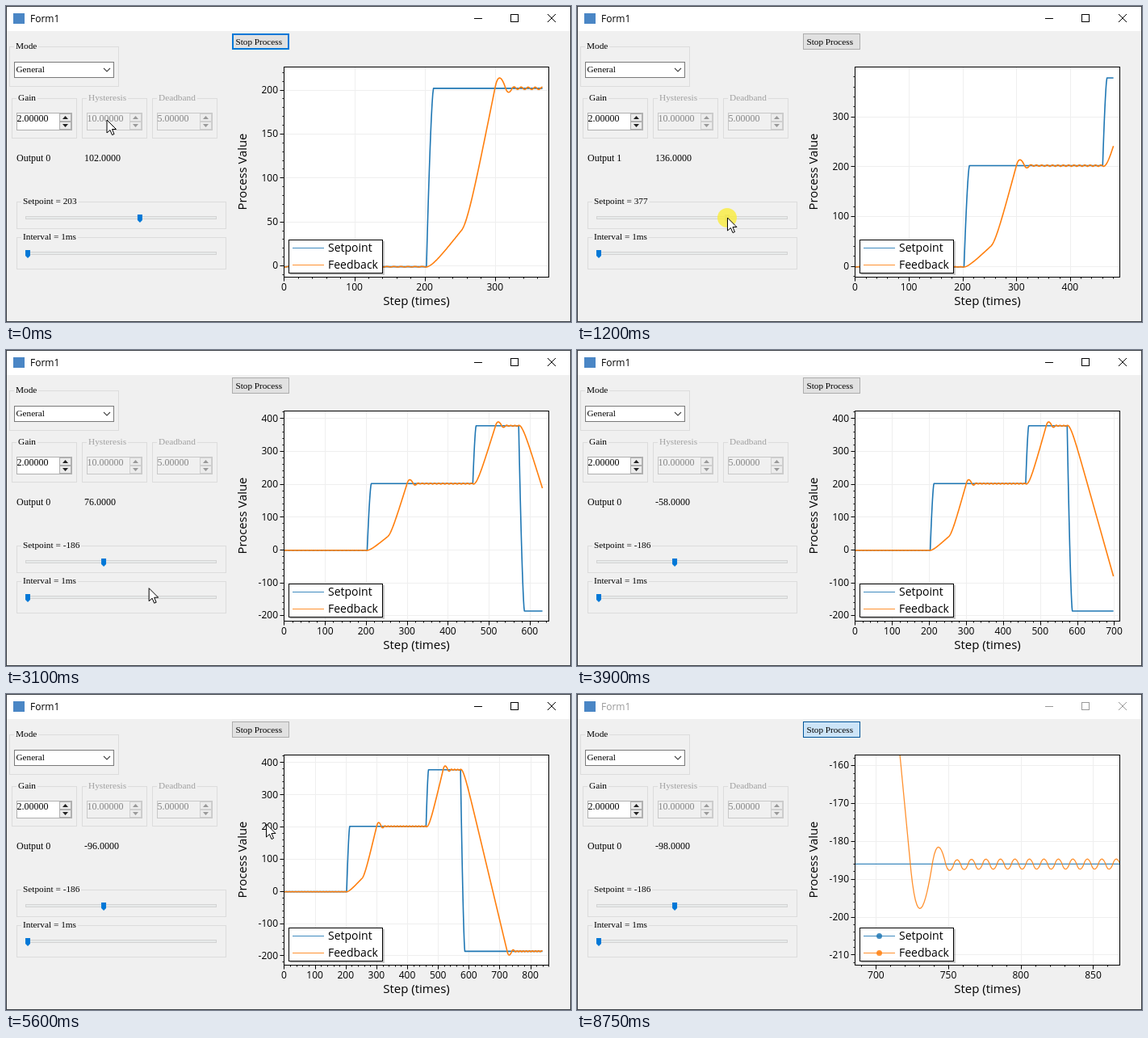
An HTML page with a canvas that plays this animation: 700x391 px, repeating every 8800 ms.

```html
<!DOCTYPE html>
<html lang="en">
<head>
<meta charset="utf-8">
<title>Form1</title>
<style>
html, body { margin: 0; width: 100%; height: 100%; overflow: hidden; background: #f0f0f0; }
canvas { display: block; width: 100vw; height: 100vh; }
</style>
</head>
<body>
<canvas id="stage" width="700" height="391"></canvas>
<script>
const c = document.getElementById('stage').getContext('2d');
const SERIF = '"Liberation Serif", serif', SANS = '"Open Sans", sans-serif';
const BLUE = '#1f77b4', ORANGE = '#ff7f0e', ACCENT = '#0078d7';
const LOOP = 8800, LAST = 869, ZOOM = 7300;
const BOX = { l: 344.5, r: 672.5, t: 75.5, b: 335.5 };

// Setpoint moves: first step, duration, new value
const moves = [[202, 10, 202], [460, 8, 378], [572, 14, -186]];
function setpoint(n) {
  let v = -1;
  for (const [start, len, to] of moves) {
    const p = Math.min(1, Math.max(0, (n - start) / len));
    v += (to - v) * (1 - (1 - p) ** 1.5);
  }
  return v;
}

// Up/down controller with a first-order process
const log = [];
let fb = -1.218, out = -1.75;
for (let n = 0; n <= LAST; n++) {
  const sp = setpoint(n), up = sp > fb;
  out += (up ? 1 : -1) * (n > 253 ? 2 : 0.5);
  if (n === 253) out = 26;
  fb += 0.1 * (2 * out - fb);
  log.push({ sp, fb, out, up });
}

// Linear interpolation in rows of [time, ...values]
function at(keys, t) {
  if (t <= keys[0][0]) return keys[0].slice(1);
  const i = keys.findIndex(k => k[0] >= t);
  if (i < 0) return keys[keys.length - 1].slice(1);
  const a = keys[i - 1], b = keys[i], p = (t - a[0]) / (b[0] - a[0]);
  return a.slice(1).map((v, j) => v + (b[j + 1] - v) * p);
}
const steps = [[0, 367], [1200, 480], [2350, 568], [3900, 697], [4850, 776], [5970, LAST]];
const approach = [[0, 125, 141], [150, 126, 143], [450, 150, 215], [750, 166, 262]];
const leave = [[2650, 121, 262], [2900, 140, 275], [3600, 270, 344], [3750, 300, 391]];
const toPlot = [[5450, 330, 338], [5550, 325, 200], [5750, 315, 44], [6050, 315, 44],
  [6300, 345, 89], [6650, 600, 305], [6800, 597, 306], [7150, 654, 327], [7250, 664, 328],
  [7900, 664, 328], [8250, 671, 367]];

function text(s, x, y, size, color = '#000', font = SERIF, align = 'left') {
  c.font = size + 'px ' + font;
  c.textAlign = align;
  c.fillStyle = color;
  c.fillText(s, x, y);
}
function rect(x, y, w, h, fill, stroke) {
  if (fill) { c.fillStyle = fill; c.fillRect(x, y, w, h); }
  if (stroke) { c.strokeStyle = stroke; c.lineWidth = 1; c.strokeRect(x + .5, y + .5, w - 1, h - 1); }
}
function line(pts, color, width = 1) {
  c.beginPath();
  pts.forEach(p => c.lineTo(...p));
  c.strokeStyle = color;
  c.lineWidth = width;
  c.stroke();
}
function shape(pts, fill) {
  c.beginPath();
  pts.forEach(p => c.lineTo(...p));
  c.closePath();
  c.fillStyle = fill;
  c.fill();
}
function disc(x, y, r, fill) {
  c.beginPath();
  c.arc(x, y, r, 0, 7);
  c.fillStyle = fill;
  c.fill();
}

function group(title, x, y, w, h, tx, color) {
  rect(x, y, w, h, null, '#dcdcdc');
  c.font = '11.3px ' + SERIF;
  rect(tx - 2, y, c.measureText(title).width + 4, 1, '#f0f0f0');
  text(title, tx, y + 3, 11.3, color);
}
function spinner(title, value, x, on) {
  group(title, x, 114, 81, 50, x + 8, on ? '#000' : '#a0a0a0');
  rect(x + 6, 132, 69, 22, on ? '#fff' : '#f0f0f0', on ? '#b0b0b0' : '#c8c8c8');
  text(value, x + 6.5, 143, 12, on ? '#000' : '#858585');
  const ink = on ? '#222' : '#999', ax = x + 66.5;
  for (const y of [133, 143]) rect(x + 59, y, 15, 10, '#ececec', on ? '#b0b0b0' : '#d0d0d0');
  shape([[ax - 3.5, 140], [ax, 136], [ax + 3.5, 140]], ink);
  shape([[ax - 3.5, 146], [ax + 3.5, 146], [ax, 150]], ink);
}
function slider(y, x, color) {
  rect(24, y, 237, 4, '#e7eaea', '#d3d3d3');
  shape([[x - 3, y - 2], [x + 3, y - 2], [x + 3, y + 5], [x, y + 8], [x - 3, y + 5]], color);
}

function windowFrame(active) {
  rect(0, 0, 700, 391, '#f0f0f0');
  rect(0, 0, 700, 31, '#fff');
  rect(0, 0, 700, 391, null, '#3a3f45');
  rect(9, 9, 14, 13, '#4a86c5');
  const ink = active ? '#000' : '#999';
  text('Form1', 30, 20, 12, ink, SANS);
  line([[580, 15.5], [590, 15.5]], ink);
  rect(625, 10, 10, 10, null, ink);
  line([[671, 10], [681, 20]], ink);
  line([[671, 20], [681, 10]], ink);
}

function form(t, n, value, knob, down) {
  group('Mode', 4, 50, 136, 50, 12);
  rect(10, 69, 124, 20, '#fff', '#7a7a7a');
  text('General', 12.5, 82, 11.2);
  line([[121, 77], [125, 81], [129, 77]], '#444', 1.1);
  spinner('Gain', '2.00000', 7, true);
  spinner('Hysteresis', '10.00000', 94, false);
  spinner('Deadband', '5.00000', 181, false);
  text('Output ' + (log[n].up ? 1 : 0), 13, 192, 12);
  text(log[n].out.toFixed(4), 97, 192, 12);
  group('Setpoint = ' + value, 13, 242, 260, 34, 21);
  slider(260, knob, down ? '#cccccc' : ACCENT);
  group('Interval = 1ms', 13, 286, 260, 40, 21);
  slider(304, 27, ACCENT);

  const pressed = t >= 5900, hover = t >= 5700;
  rect(280, 34, 71, 20, pressed ? '#cce4f7' : hover ? '#e5f1fb' : '#e1e1e1',
    pressed ? '#005499' : hover || t < 850 ? ACCENT : '#adadad');
  if (t < 850) rect(281, 35, 69, 18, null, ACCENT);
  text('Stop Process', 284.5, 48, 11.2);
}

function view(t, n) {
  if (t >= ZOOM) return [685.6, 868.4, -212.8, -157.3];
  let lo = Infinity, hi = -Infinity;
  for (let i = 0; i <= n; i++) {
    lo = Math.min(lo, log[i].sp, log[i].fb);
    hi = Math.max(hi, log[i].sp, log[i].fb);
  }
  const pad = (hi - lo) / 18;
  return [0, n * 1.0263, lo - pad, hi + pad];
}

function ticks(from, to, step, draw) {
  const minor = step / 5;
  for (let k = Math.ceil(from / minor); k * minor <= to; k++) draw(k * minor, k % 5 === 0);
}

function plot(t, n) {
  const { l, r, t: top, b } = BOX, zoomed = t >= ZOOM;
  const [x0, x1, y0, y1] = view(t, n);
  const X = v => l + (v - x0) / (x1 - x0) * (r - l);
  const Y = v => b - (v - y0) / (y1 - y0) * (b - top);
  const snap = v => Math.round(v - .01) + .5;
  rect(l, top, r - l, b - top, '#fff');
  ticks(x0, x1, zoomed ? 50 : 100, (v, major) => {
    const x = snap(X(v));
    if (major) {
      line([[x, top], [x, b]], '#efefef');
      text(v, X(v), 352, 12, '#000', SANS, 'center');
    }
    line([[x, b], [x, b + (major ? 5 : 2)]], '#000');
  });
  ticks(y0, y1, zoomed ? 10 : y1 - y0 < 300 ? 50 : 100, (v, major) => {
    const y = snap(Y(v));
    if (major) {
      line([[l, y], [r, y]], '#efefef');
      text(v, 337, Y(v) + 4.3, 12, '#000', SANS, 'right');
    }
    line([[l - (major ? 5 : 2), y], [l, y]], '#000');
  });

  c.save();
  c.beginPath();
  c.rect(l, top, r - l, b - top);
  c.clip();
  c.translate(.5, .5);
  c.lineJoin = 'round';
  c.globalAlpha = zoomed ? .85 : 1;
  const seen = log.slice(0, n + 1);
  line(seen.map((p, i) => [X(i), Y(p.sp)]), BLUE, zoomed ? 1.3 : 1.6);
  line(seen.map((p, i) => [X(i), Y(p.fb)]), ORANGE, zoomed ? 1.3 : 1.6);
  c.restore();
  rect(l - .5, top - .5, r - l + 1, b - top + 1, null, '#000');

  rect(352, 291, 117, 42, 'rgba(0,0,0,.2)');
  rect(350, 289, 117, 42, '#fff', '#000');
  [['Setpoint', BLUE, 299.5], ['Feedback', ORANGE, 320.5]].forEach(([name, color, y]) => {
    c.globalAlpha = .85;
    line([[355, y], [394, y]], color, 1.2);
    if (zoomed) disc(374.5, y, 3.5, color);
    c.globalAlpha = 1;
    text(name, 399, y + 4.5, 14, '#000', SANS);
  });

  text('Step (times)', 508.5, 370, 15, '#000', SANS, 'center');
  c.save();
  c.translate(298, 205);
  c.rotate(-Math.PI / 2);
  text('Process Value', 0, 0, 14.8, '#000', SANS, 'center');
  c.restore();
}

function pointer(t, knob, down) {
  let p;
  if (t < 850) p = at(approach, t);
  else if (t < 2650) p = [knob + .5, 262];
  else if (t < 3750) p = at(leave, t);
  else if (t >= 5450 && t < 8300) p = at(toPlot, t);
  if (!p) return;
  const [x, y] = p;
  if (t > 6800 && t < ZOOM) {
    rect(597, 306, x - 597, y - 306, 'rgba(255,0,0,.2)', 'rgba(255,0,0,.4)');
  }
  if (down || (t >= 5900 && t < 6050)) disc(x - .5, y, 12, 'rgba(250,236,60,.8)');
  const arrow = [[0, 0], [0, 16], [4, 12.5], [6.5, 18.5], [9, 17.5], [6.5, 11.5], [11.5, 11.5]]
    .map(([dx, dy]) => [x + dx, y + dy]);
  shape(arrow, '#fff');
  line([...arrow, arrow[0]], '#000');
}

function frame(now) {
  const t = Math.floor(now % LOOP / 50) * 50;
  const n = Math.round(at(steps, t)[0]);
  const value = n < 460 ? 203 : Math.min(377, Math.round(log[n].sp));
  const knob = 142.5 + value / 8.67;
  const down = t >= 850 && t < 2650;
  windowFrame(t < 8750);
  form(t, n, value, knob, down);
  plot(t, n);
  pointer(t, knob, down);
  requestAnimationFrame(frame);
}
requestAnimationFrame(frame);
</script>
</body>
</html>
```
